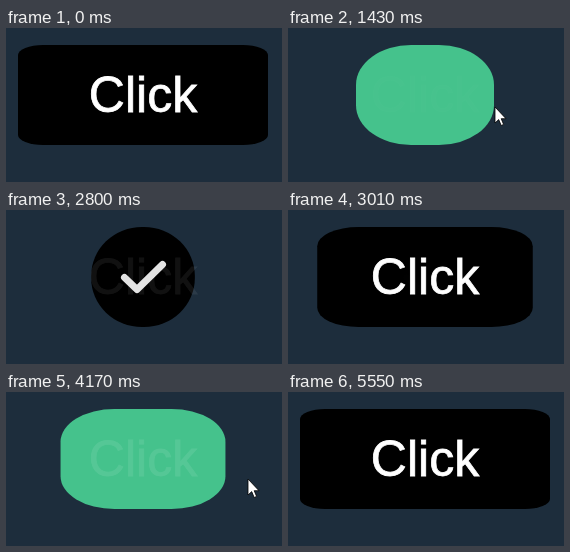
An HTML page for the animation above (6210 ms loop, 276x154 px).

```html
<!DOCTYPE html>
<html lang="en">
<head>
<meta charset="utf-8">
<title>Click button</title>
<style>
  html, body { margin: 0; width: 100%; height: 100%; overflow: hidden; background: #1d2d3c; }
  svg { display: block; width: 100%; height: 100%; }
  text { font: 50px "Liberation Sans", Arial, sans-serif; fill: #fff; stroke: #fff; stroke-width: .8; text-anchor: middle; }
  #check { fill: none; stroke: #f4f4f4; stroke-width: 7; stroke-linecap: round; stroke-linejoin: round; }
  .pointer { fill: #fff; stroke: #000; stroke-width: .8; }
</style>
</head>
<body>
<svg viewBox="0 0 276 154">
  <rect id="button" y="17" height="100"/>
  <text id="label" x="137" y="84">Click</text>
  <path id="check" d="M118.5 67.5 L131 79.5 L156.5 54.5"/>
  <g id="cursor">
    <path id="hand" class="pointer" d="M-1 2 Q.5 0 2 2 V8 L5 8.5 L8 9.5 L11 11 V16 L9 23 H1 L-1 19 L-5 13 Q-5 10 -3 11 L-1 13Z M2 8 V11 M5 8.5 V11.5 M8 9.5 V12"/>
    <path id="arrow" class="pointer" d="M0 0 V16 L3.7 12.6 L6.2 18.5 L8.6 17.4 L6.2 11.7 H11Z"/>
    <circle id="press" r="12" cx="-1" fill="#faf000" fill-opacity=".5"/>
  </g>
</svg>
<script>
const LOOP = 6210, STEP = 70;
const MORPH = 490, FADE = 250, PRESS = 60, LEAD = 20, TRAVEL = 340, EXIT = 210;

// Each cycle: the cursor enters, presses and leaves, then the button reopens
const cycles = [
  { enter: 330, press: 1150, leave: 2000, reopen: 2800, from: [244, 140], rest: [207, 79], to: [220, 81] },
  { enter: 3680, press: 3949, leave: 4310, reopen: 5060, from: [276, 93], rest: [242, 87], to: [300, 87] }
];

const $ = id => document.getElementById(id);
const clamp = v => Math.max(0, Math.min(1, v));
const mix = (a, b, k) => a.map((v, i) => v + (b[i] - v) * k);

// The CSS "ease" curve, cubic-bezier(.25, .1, .25, 1)
function ease(x) {
  const bezier = (p, q, u) => 3 * p * u * (1 - u) ** 2 + 3 * q * u * u * (1 - u) + u ** 3;
  let low = 0, high = 1;
  for (let i = 0; i < 24; i++) {
    const u = (low + high) / 2;
    if (bezier(.25, .25, u) < clamp(x)) low = u; else high = u;
  }
  return bezier(.1, 1, low);
}

function buttonState(t, cycle) {
  const closing = t - cycle.press - PRESS, opening = t - cycle.reopen + LEAD;
  if (opening >= 0) {
    const fade = ease(opening / FADE);
    return { done: false, morph: 1 - ease(opening / MORPH), label: fade, check: 1 - fade };
  }
  return {
    done: closing >= 0,
    morph: ease(closing / MORPH),
    label: 1 - ease(closing / FADE),
    check: ease((closing - MORPH) / FADE)
  };
}

function cursorAt(t, { enter, leave, from, rest, to }) {
  if (t < enter || t >= leave + EXIT) return null;
  if (t > leave) return mix(rest, to, ((t - leave) / EXIT) ** 2);
  return mix(from, rest, ease((t - enter) / TRAVEL));
}

const show = (id, on) => $(id).setAttribute("visibility", on ? "visible" : "hidden");
const set = (id, attrs) => Object.entries(attrs).forEach(([k, v]) => $(id).setAttribute(k, v));

function draw(time) {
  // Motion advances in even steps from the start of each phase
  const cycle = cycles.findLast(c => c.enter <= time) ?? cycles[0];
  const phase = time >= cycle.reopen ? cycle.reopen : cycle.enter;
  const offset = cycle === cycles[0] && time >= cycle.press && time < cycle.reopen ? cycle.press : phase;
  const t = offset + Math.floor((time - offset) / STEP) * STEP;

  const { done, morph, label, check } = buttonState(t, cycle);
  const width = 250 - 150 * morph, radius = .1 + .4 * morph;
  set("button", { x: 137 - width / 2, width, rx: width * radius, ry: 100 * radius, fill: done ? "#45c28c" : "#000" });
  set("label", { opacity: label });
  set("check", { opacity: check });

  const cursor = cursorAt(t, cycle);
  if (cursor) set("cursor", { transform: `translate(${cursor})` });
  const hover = cursor && cursor[1] < 117 && Math.abs(cursor[0] - 137) < width / 2;
  show("hand", hover);
  show("arrow", cursor && !hover);
  show("press", cursor && t >= cycle.press && t < cycle.press + PRESS);
}

const begin = performance.now();
function tick() {
  draw((performance.now() - begin) % LOOP);
  requestAnimationFrame(tick);
}
tick();
</script>
</body>
</html>
```
